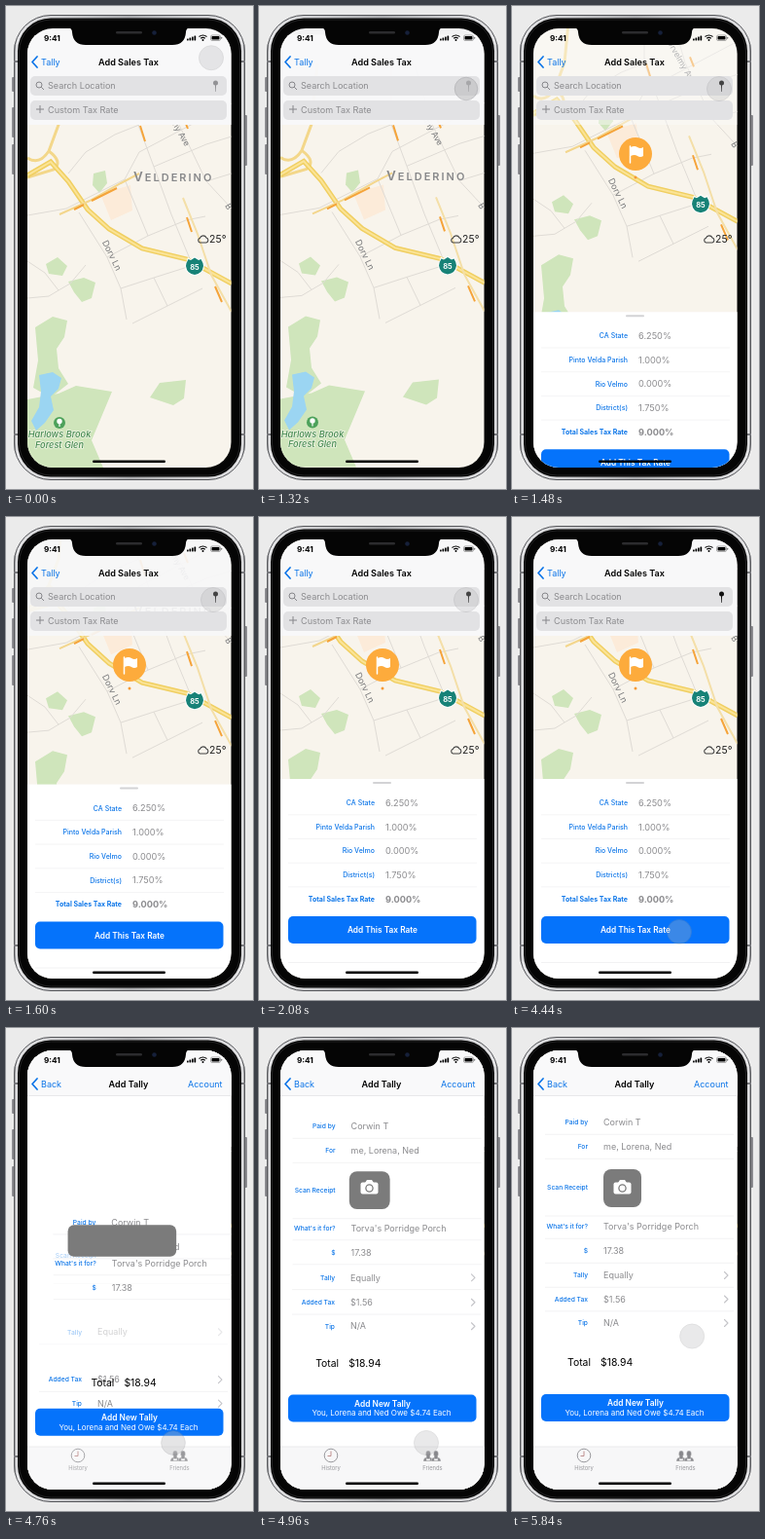
An HTML page for the animation above (5.88 s loop, 254x496 px).

```html
<!DOCTYPE html>
<html lang="en">
<head>
<meta charset="utf-8">
<title>Add Sales Tax</title>
<style>
html, body { margin: 0; width: 100%; height: 100%; overflow: hidden; background: #ebebeb; }
svg { display: block; width: 100%; height: 100%; font-family: Inter, "Liberation Sans", sans-serif; }
</style>
</head>
<body>
<svg id="stage" viewBox="0 0 254 496"></svg>
<script>
const LOOP = 5880, BLUE = '#0a74e8', GREY = '#8b8b8e';

const text = (x, y, size, str, fill = '#000', anchor = 'start', extra = '') =>
  `<text x="${x}" y="${y + size * 0.36}" font-size="${size}" fill="${fill}" text-anchor="${anchor}" ${extra}>${str}</text>`;
const rect = (x, y, w, h, r, fill, extra = '') =>
  `<rect x="${x}" y="${y}" width="${w}" height="${h}" rx="${r}" fill="${fill}" ${extra}/>`;
const line = (d, stroke, w = 1, extra = '') =>
  `<path d="${d}" fill="none" stroke="${stroke}" stroke-width="${w}" ${extra}/>`;
const shape = (d, fill) => `<path d="${d}" fill="${fill}"/>`;
const group = (id, body, extra = '') => `<g id="${id}" ${extra}>${body}</g>`;
const bold = 'font-weight="700"', semi = 'font-weight="600"', round = 'stroke-linecap="round" stroke-linejoin="round"';

const land = () => {
  const minor = [
    'M22 215L62 208L122 178L137 150L232 100', 'M136 60V122L152 165L170 214L190 262',
    'M160 60L178 122L206 180L232 208', 'M75 212L104 258L118 290L124 322',
    'M104 258L146 236L185 220L205 216', 'M118 290L152 279L190 267', 'M130 326L166 308L202 290',
    'M152 279L166 308', 'M152 165L206 142L232 134', 'M206 180L232 172', 'M122 178L146 236',
    'M22 262L40 274L54 292L66 285L82 266', 'M22 300L44 298L54 292', 'M137 122L112 132L82 150L64 172'
  ].map(d => line(d, '#dfdbd5')).join('');
  const green = '#cfe5bb', water = '#9bd5f2';
  const highway = 'M22 174L46 160L64 180L84 209L106 229L140 249L186 260L232 285';
  return rect(22, 30, 210, 540, 0, '#f8f4ec') +
    shape('M97 193L128 184L130 210L108 220Z', '#fcebd9') +
    shape('M90 172L102 169L104 182L96 192L89 184Z', green) +
    shape('M41 265L53 258L63 267L58 277L44 275Z', green) +
    shape('M64 283L80 279L92 284L88 300L78 304L70 294Z', green) +
    shape('M30 330L48 319L63 323L60 340L52 352L54 372L64 388L46 402L28 392L33 364Z', green) +
    shape('M148 402L158 387L185 384L183 403L172 410L160 406Z', green) +
    shape('M22 404L54 398L72 390L109 396L88 446L100 474H22Z', green) +
    shape('M34 379L48 376L57 382L54 393L46 401L49 415L40 428L31 436L26 426L34 412L36 396Z', water) +
    minor +
    line('M60 60L54 122L44 149Q34 164 22 156M44 149Q59 160 49 168L22 176', '#f3d78a', 3) +
    line(highway, '#f0cf62', 5) + line(highway, '#fbe497', 2) +
    line('M55 214L86 200L118 182L137 172', '#f3d68d', 2) +
    line('M182 197L197 234L211 276L232 314', '#f4dfa8', 2) +
    line('M70 209L80 204M88 200L114 187M138 123L143 139M186 217L191 232M215 288L222 304M183 116L187 126', '#f5a43a', 2) +
    text(131, 175, 13.5, 'V<tspan font-size="11">ELDERINO</tspan>', '#87888a', 'start', semi + ' letter-spacing="2"') +
    text(0, 0, 9, 'Dorv Ln', '#77787a', 'middle', 'transform="translate(109 256) rotate(64)"') +
    text(0, 0, 8.5, 'Orvelmy Ave', '#77787a', 'end', 'transform="translate(187 143) rotate(60)"') +
    text(0, 0, 8.5, 'B', '#77787a', 'middle', 'transform="translate(229 206) rotate(60)"') +
    shape('M187 258L190 260L194 257L198 260L201 258Q202 262 204 266Q204 275 194 277Q184 275 184 266Q186 262 187 258Z', '#fff') +
    shape('M187.500 260L190 261L194 258.500L198 261L200.500 260Q203 264 203 267Q202 275 194 276Q186 275 185 267Q185 264 187.500 260Z', '#178277') +
    text(194, 268, 7.5, '85', '#fff', 'middle', bold) +
    '<circle cx="55" cy="428" r="6" fill="#4da25b"/><circle cx="55" cy="426.500" r="2.700" fill="#fff"/>' +
    line('M55 426V432', '#fff', 1.2) +
    ['Harlows Brook', 'Forest Glen'].map((s, i) =>
      text(55, 440 + i * 10.5, 9.2, s, '#478c52', 'middle', 'font-style="italic" font-weight="500" stroke="#eef3e4" stroke-width="1.500" paint-order="stroke"')).join('');
};

const weather = line('M199.500 243A2.500 2.500 0 0 1 199.500 238.200A3.500 3.500 0 0 1 206 238A2.600 2.600 0 0 1 206 243Z', '#444', 1.1) +
  text(209, 239, 10.5, '25°', '#222');

const flag = '<circle cx="127" cy="176" r="1.500" fill="#f59a36"/>' + group('pin',
  '<circle r="17" fill="#fdab3c"/>' + line('M-5.500 -8V9', '#fff', 1.5, round) +
  shape('M-5 -7Q-1 -9 2 -7T8 -7V2Q5 4 2 2T-5 2Z', '#fff'));

const rates = [['CA State', '6.250%'], ['Pinto Velda Parish', '1.000%'], ['Rio Velmo', '0.000%'],
  ['District(s)', '1.750%'], ['Total Sales Tax Rate', '9.000%']];
const sheet = rect(22, 269, 210, 240, 0, '#fff') + rect(117, 272, 19, 2, 1, '#d3d3d5') +
  rates.map(([label, value], i) => {
    const y = 293.5 + i * 24.7, w = i == 4 ? bold : '';
    return text(119, y, 7, label, BLUE, 'end', w || 'font-weight="500"') + text(130, y, 9.2, value, GREY, 'start', w) +
      (i < 4 ? line(`M30 ${y + 12.3}H224`, '#ededee', 0.6) : '');
  }).join('') + line('M30 457.500H224', '#ededee', 0.7);

const back = label => line('M32 52L27 57.500L32 63', BLUE, 1.7, round) + text(36, 57.5, 9, label, BLUE);
const taxBar = rect(22, 22, 210, 100, 0, '#f8f8f9', 'id="taxBack"') + back('Tally') +
  text(126, 57.5, 9.1, 'Add Sales Tax', '#000', 'middle', semi) +
  rect(25, 72, 202, 20, 5, '#e2e2e4') + rect(25, 97, 202, 20, 5, '#e2e2e4') +
  '<circle cx="34" cy="81" r="3" fill="none" stroke="#86868a"/>' + line('M36.200 83.200L39 86M35 102V110M31 106H39', '#86868a') +
  text(43, 82, 9.1, 'Search Location', GREY) + text(43, 107, 9.1, 'Custom Tax Rate', GREY) +
  group('drop', '<circle cx="215.500" cy="79" r="2.500"/><path d="M214.900 80H216.100L215.800 88H215.200Z"/>');

// label, value, y, start offset x, start offset y, chevron
const fields = [
  ['Paid by', 'Corwin T', 97, 33, 236], ['For', 'me, Lorena, Ned', 122, 33, 236],
  ['Scan Receipt', '', 164, 34, 160], ["What's it for?", "Torva's Porridge Porch", 204, 34, 86],
  ['$', '17.38', 229, 34, 86], ['Tally', 'Equally', 254, 0, 134, 1],
  ['Added Tax', '$1.56', 278.5, 0, 190, 1], ['Tip', 'N/A', 303, 0, 190, 1]];
const form = rect(22, 22, 210, 453, 0, '#fff') +
  fields.map(([label, value, y, , , more], i) => group('row' + i,
    text(78, y, 6.7, label, BLUE, 'end', 'font-weight="500"') + text(94, y, 9, value, GREY) +
    (more ? line(`M218.500 ${y - 3.5}L222 ${y}L218.500 ${y + 3.5}`, '#c4c4c8', 1.1, round) : '') +
    (i < 7 ? line(`M34 ${y + (i == 2 ? 29 : 12.3)}H228`, '#eeeeef', 0.7) : ''))).join('') +
  rect(94, 145, 39, 39, 8, '#7b7b7b', 'id="scan"') +
  group('camera', rect(104.5, 158.5, 18, 12, 2, '#fff') + shape('M109 159L111 156H116L118 159Z', '#fff') +
    '<circle cx="113.500" cy="164.500" r="3.600" fill="#fff" stroke="#7b7b7b" stroke-width="1.300"/>') +
  group('total', text(57, 343.5, 10.4, 'Total') + text(91, 343.5, 10.4, '$18.94')) +
  rect(22, 22, 210, 47, 0, '#f9f9fa') + line('M22 69.500H232', '#e3e3e5', 0.8) +
  back('Back') + text(126, 57.5, 9.1, 'Add Tally', '#000', 'middle', semi) + text(222.5, 57.5, 9, 'Account', BLUE, 'end');

const person = x => `<g transform="translate(${x} 439) scale(.85)" fill="#88888c" stroke="#f7f7f8" stroke-width=".500"><path d="M-6 7Q-6 3 -2 2V6H2V2Q6 3 6 7Z"/><ellipse cy="-2" rx="3" ry="4"/><path d="M-2 1H2V4H-2Z" stroke="none"/></g>`;
const tabs = rect(22, 430, 210, 46, 0, '#f7f7f8') + line('M22 430H232', '#e2e2e4', 0.7) +
  '<circle cx="74" cy="439" r="6.800" fill="none" stroke="#8f8f93" stroke-width=".900"/>' + line('M74 434.500V439.500H70.500', '#b98585', 0.9) +
  person(174) + person(182) +
  text(74, 452, 5.8, 'History', '#97979b', 'middle') + text(178.5, 452, 5.8, 'Friends', '#97979b', 'middle');

const button = rect(30, 410, 193.5, 28, 5, '#0573fb') +
  group('rateText', text(127, 424, 8.3, 'Add This Tax Rate', '#fff', 'middle', semi)) +
  group('oweText', text(127, 419, 8.4, 'Add New Tally', '#fff', 'middle', semi) +
    text(126, 429, 8, 'You, Lorena and Ned Owe $4.74 Each', '#fff', 'middle'));

const status = text(39, 33, 8.2, '9:41', '#000', 'start', bold) +
  [0, 1, 2, 3].map(i => rect(186 + i * 2.5, 33.5 - i, 1.7, 2 + i, 0.4, '#000')).join('') +
  line('M198.500 31.500Q202.500 28.500 206.500 31.500M200.200 33.300Q202.500 31.500 204.800 33.300', '#000', 1.1) +
  '<circle cx="202.500" cy="35" r="1"/>' +
  rect(210.5, 30, 10, 5.5, 1.5, 'none', 'stroke="#777" stroke-width=".600"') + rect(211.5, 31, 8, 3.5, 0.8, '#000') + rect(221.2, 31.8, 0.9, 2, 0.4, '#777');

const body = [[73, 15], [104, 31], [142, 31]].map(([y, h]) => rect(6, y, 3, h, 1, '#8b8b8f')).join('') +
  rect(245, 112, 3, 52, 1, '#8b8b8f') +
  rect(8, 9, 238, 478, 38, 'url(#metal)') + rect(8.5, 9.5, 237, 477, 37.5, 'none', 'stroke="#55565a"') +
  rect(12, 12.5, 230, 471, 34, '#050505') + rect(13.5, 14, 227, 468, 33, 'none', 'stroke="#2b2b2d" stroke-width=".700"') +
  line('M8 57H12M242 57H246M8 440H12M242 440H246', '#77787c', 2);
const notch = shape('M64 22Q68 23 68 27Q69 40 82 40H171Q184 40 185 27Q185 23 189 22Z', '#050505') +
  rect(113, 26, 27, 2.6, 1.3, '#2c2c2e') + '<circle cx="152.500" cy="27.500" r="2.300" fill="#16203a"/>';

const stage = document.getElementById('stage');
stage.innerHTML = `<defs>
  <linearGradient id="metal"><stop offset="0" stop-color="#77787c"/><stop offset=".012" stop-color="#e4e4e6"/>
  <stop offset=".5" stop-color="#a9aaad"/><stop offset=".988" stop-color="#e4e4e6"/><stop offset="1" stop-color="#77787c"/></linearGradient>
  <clipPath id="screen">${rect(22, 23, 209.5, 451, 26, '#000')}</clipPath></defs>` + body +
  group('view', group('map', land()) + weather + group('flag', flag) + group('sheet', sheet) + group('taxBar', taxBar) +
    group('form', form) + group('tabs', tabs) + group('button', button) + status +
    rect(89, 466.5, 75, 2.6, 1.3, '#000'), 'clip-path="url(#screen)"') +
  notch + group('touch', '<circle r="12.500" fill="#b9b9bb" stroke="#8c8c90" stroke-width=".800"/>');

const el = {};
stage.querySelectorAll('[id]').forEach(e => el[e.id] = e);
const set = (id, attrs) => Object.entries(attrs).forEach(([k, v]) => el[id].setAttribute(k, v));
const move = (id, x, y, scale = 1) => set(id, { transform: `translate(${x} ${y}) scale(${scale})` });
const fade = (id, v) => set(id, { opacity: clamp(v) });
const clamp = v => v < 0 ? 0 : v > 1 ? 1 : v;
const mix = (a, b, p) => a + (b - a) * p;
const easeOut = u => 1 - (1 - u) ** 3;
const easeInOut = u => u < 0.5 ? 4 * u ** 3 : 1 - 4 * (1 - u) ** 3;
const phase = (t, start, length) => clamp((t - start) / length);
const bump = (t, mid, half) => clamp(1 - Math.abs(t - mid) / half);

function draw(t) {
  const up = easeOut(phase(t, 1320, 400));
  const done = easeOut(phase(t, 4664, 400)), rest = 1 - done;

  move('map', 0, -81 * up);
  move('sheet', 0, 212 * (1 - up));
  fade('taxBack', 1 - 3.2 * up * (1 - up));
  fade('flag', up * 3);
  move('pin', 127, 152, clamp(up * 1.4));
  set('drop', { fill: t < 1360 ? '#929295' : '#111' });

  fade('form', done * 2);
  fade('tabs', done * 1.5);
  fields.forEach(([, , , dx, dy], i) => move('row' + i, dx * rest, dy * rest));
  fade('row5', (done - 0.35) * 1.8);
  fade('row2', (done - 0.4) * 2);
  set('scan', { x: mix(24, 94, done), y: mix(277, 145, done), width: mix(206, 39, done), height: mix(24, 39, done), rx: mix(4, 8, done) });
  fade('camera', (done - 0.7) * 4);
  move('total', 70 * rest, 48 * rest);
  move('button', 0, 212 * (1 - up) - 34 * done);
  fade('rateText', 1 - done * 2);
  fade('oweText', done * 2);

  const settle = easeOut(phase(t, 0, 400));
  const travel = easeInOut(phase(t, 2763, 772)) - easeInOut(phase(t, 5508, 772));
  const press = bump(t, 1320, 160) + bump(t, 4640, 160);
  move('touch', mix(mix(211, 213, settle), 172, travel), mix(mix(53, 85, settle), 426, travel), 1 - 0.06 * press);
  fade('touch', 0.3 + 0.25 * press);
}

const tick = () => {
  draw(performance.now() % LOOP);
  requestAnimationFrame(tick);
};
tick();
</script>
</body>
</html>
```
